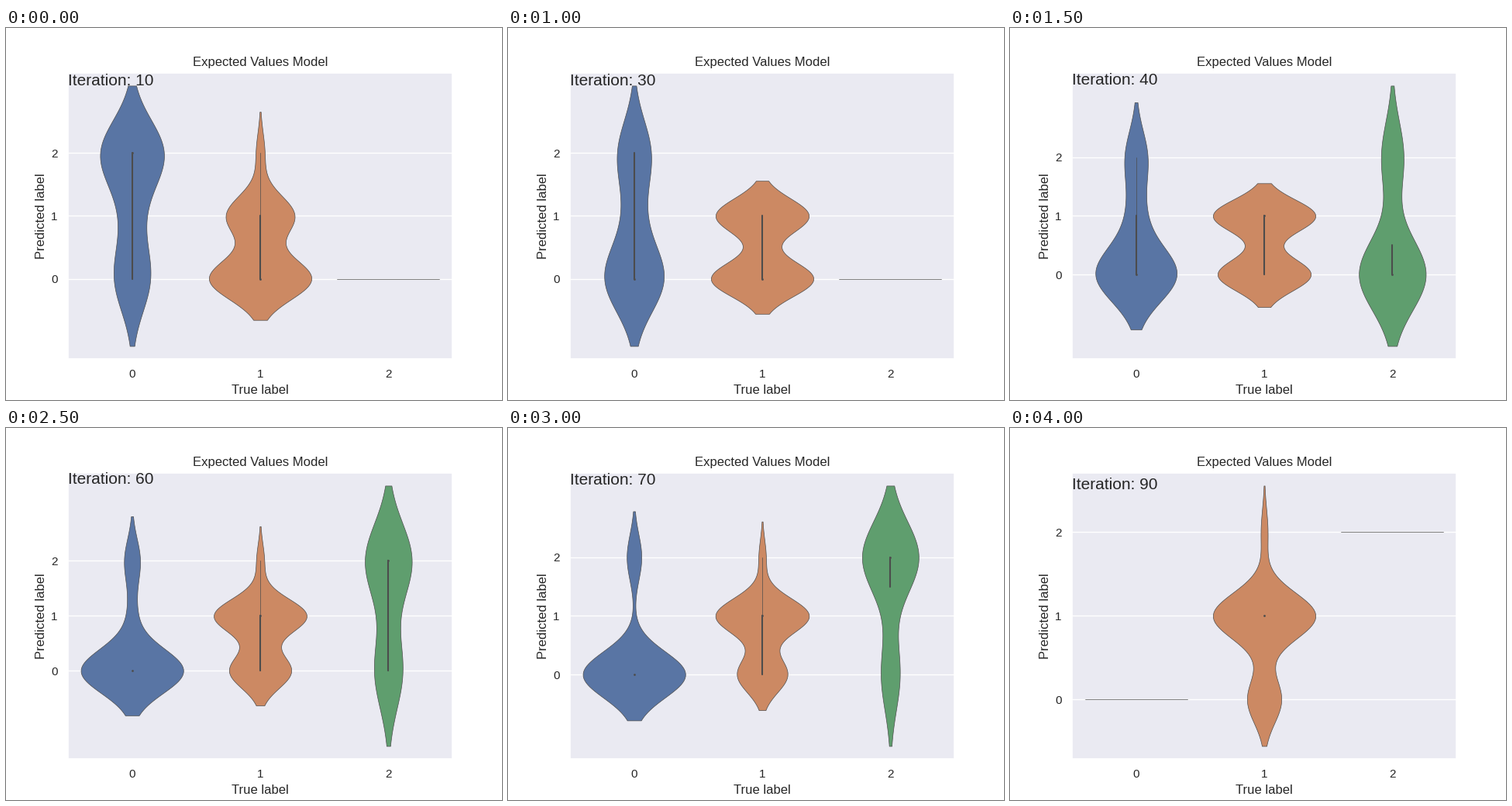
A matplotlib script that plays this animation: 640x480 px, repeating every 7 s.

```python
import colorsys

import matplotlib.pyplot as plt
import numpy as np
from matplotlib.animation import FuncAnimation
from matplotlib.colors import to_rgb

STEP_MS = 500
STEPS = 9
HOLD_STEPS = 6
SIZES = (16, 21, 8)  # samples per true label
INK = "0.15"
LINE = 0.5
HALF = 0.4
CUT = 2

plt.rcParams.update({
    "font.family": "Liberation Sans",
    "text.color": INK,
    "axes.facecolor": "#EAEAF2",
    "axes.edgecolor": "white",
    "axes.labelcolor": INK,
    "axes.linewidth": 1.25,
    "axes.grid": True,
    "axes.axisbelow": True,
    "axes.labelsize": 12,
    "axes.titlesize": 12,
    "grid.color": "white",
    "grid.linewidth": 1,
    "lines.solid_capstyle": "round",
    "xtick.color": INK,
    "ytick.color": INK,
    "xtick.labelsize": 11,
    "ytick.labelsize": 11,
    "xtick.major.size": 6,
    "ytick.major.size": 6,
    "xtick.bottom": False,
    "ytick.left": False,
})


def muted(color):
    h, l, s = colorsys.rgb_to_hls(*to_rgb(color))
    return colorsys.hls_to_rgb(h, l, s * 0.75)


COLORS = [muted(c) for c in ("#4C72B0", "#DD8452", "#55A868")]
GRAY = (0.6 * min(colorsys.rgb_to_hls(*c)[1] for c in COLORS),) * 3


def trend(step, steps, values):
    """Whole-number count moving linearly between key points."""
    return round(float(np.interp(step, steps, values)))


def predictions(step):
    """Predicted labels of each class: training moves them to the true label."""
    zeros = (trend(step, [0, 3, 8], [5, 11, 16]),
             trend(step, [1, 8], [12, 5]),
             trend(step, [2, 4, 5, 8], [8, 3, 3, 0]))
    ones_0 = trend(step, [3, 6], [2, 0])
    twos_1 = trend(step, [0, 1, 4, 5], [1, 0, 0, 1])
    ones = (ones_0, SIZES[1] - zeros[1] - twos_1, 0)
    return [np.repeat([0.0, 1.0, 2.0], [a, b, n - a - b])
            for a, b, n in zip(zeros, ones, SIZES)]


def kde(data):
    """Gaussian density with Scott's bandwidth, or None for a constant sample."""
    if np.ptp(data) == 0:
        return None
    bw = data.std(ddof=1) * len(data) ** -0.2
    grid = np.linspace(data.min() - CUT * bw, data.max() + CUT * bw, 100)
    z = (grid[:, None] - data) / bw
    return grid, np.exp(-z ** 2 / 2).sum(axis=1) / (len(data) * bw * np.sqrt(2 * np.pi))


def draw_box(x, data):
    q1, med, q3 = np.percentile(data, [25, 50, 75])
    reach = 1.5 * (q3 - q1)
    low = data[data >= q1 - reach].min()
    high = data[data <= q3 + reach].max()
    ax.plot([x, x], [low, high], color=GRAY, lw=LINE)
    ax.plot([x, x], [q1, q3], color=GRAY, lw=3 * LINE)
    ax.scatter(x, med, s=(2 * LINE) ** 2, color="white", edgecolor=GRAY, zorder=3)


def draw(frame):
    step = min(frame, STEPS - 1)
    samples = predictions(step)
    curves = [kde(s) for s in samples]
    peak = max(c[1].max() for c in curves if c)

    ax.clear()
    ends = []
    for x, (data, curve, color) in enumerate(zip(samples, curves, COLORS)):
        if curve is None:
            y = data[0]
            ax.plot([x - HALF, x + HALF], [y, y], color=GRAY, lw=LINE)
            ends.append(y)
            continue
        grid, density = curve
        width = HALF * density / peak
        ax.fill_betweenx(grid, x - width, x + width, facecolor=color,
                         edgecolor=GRAY, linewidth=LINE)
        draw_box(x, data)
        ends += [grid[0], grid[-1]]

    low, high = min(ends), max(ends)
    margin = 0.05 * (high - low)
    top = high + margin
    ax.set(xlim=(-0.5, 2.5), ylim=(low - margin, top),
           xticks=range(3), yticks=range(3),
           title="Expected Values Model",
           xlabel="True label", ylabel="Predicted label")
    ax.xaxis.grid(False)
    ax.text(-0.5, top - 0.2, f"Iteration: {10 * (step + 1)}", fontsize=15)
    return []


fig, ax = plt.subplots(figsize=(6.4, 4.8), dpi=100)
anim = FuncAnimation(fig, draw, frames=STEPS - 1 + HOLD_STEPS,
                     init_func=lambda: [], interval=STEP_MS,
                     repeat=True, repeat_delay=0)
plt.show()
```
